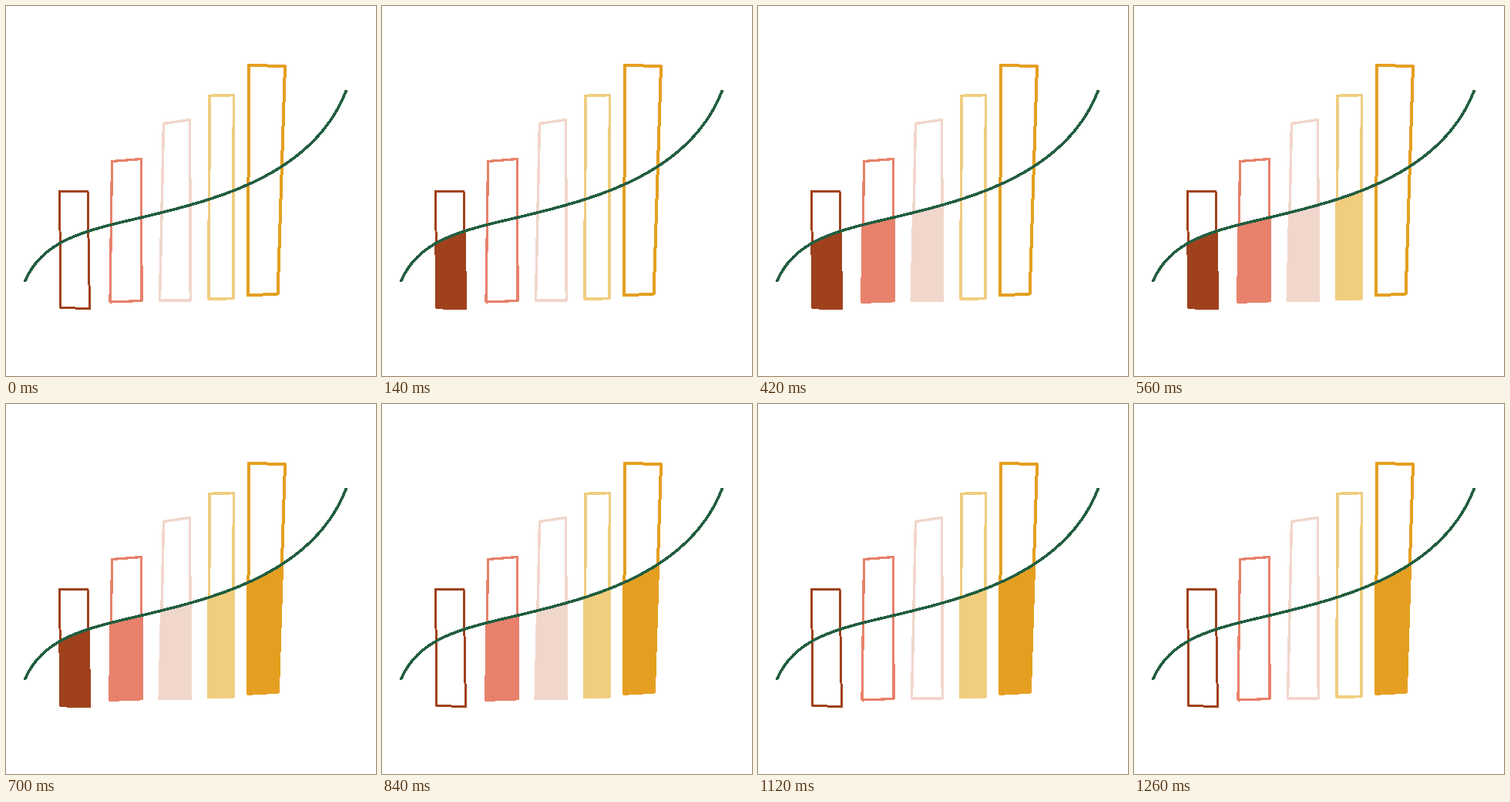
An HTML page that plays this animation: 480x480 px, repeating every 1.4 s.

```html
<!DOCTYPE html>
<html lang="en">
<head>
<meta charset="utf-8">
<title>Growing bars</title>
<style>
  html, body { margin: 0; width: 100%; height: 100%; overflow: hidden; background: #fff; }
  svg {
    display: block; width: 100%; height: 100%;
    stroke-linejoin: round; stroke-linecap: round; shape-rendering: crispEdges;
  }
</style>
</head>
<body>
<svg viewBox="0 -0.5 480 480">
  <clipPath id="below"><path id="area"/></clipPath>
  <g id="outlines" fill="none"></g>
  <g id="fills" clip-path="url(#below)"></g>
  <path id="curve" fill="none" stroke="#225e40" stroke-width="3.7"/>
</svg>
<script>
const STEP = 140;
const get = id => document.getElementById(id);

const curve = 'M25 356C50 296 120 288 200 268S400 215 441 110';
get('curve').setAttribute('d', curve);
get('area').setAttribute('d', curve + 'V480H25Z');

// colour and corners of each bar
const bars = [
  ['#a0411e', '69.5,239.5 106,240 108.5,392 71,391'],
  ['#e8816b', '137.5,201 175.5,198 176,382 135,383.5'],
  ['#f1d6cc', '204.5,152 238.5,147 239.3,381.5 199.5,381.5'],
  ['#f0cd7f', '264,116 295.5,115 294.8,379 263,379.5'],
  ['#e59f20', '315,76.5 362,77.5 352.6,373 314,375']
];

function polygon(parent, attrs) {
  const el = document.createElementNS('http://www.w3.org/2000/svg', 'polygon');
  for (const key in attrs) el.setAttribute(key, attrs[key]);
  return get(parent).appendChild(el);
}

const fills = bars.map(([stroke, points], i) => {
  const width = 3 + i / 4;
  polygon('outlines', { points, stroke, 'stroke-width': width });
  return polygon('fills', { points, stroke, fill: stroke, 'stroke-width': width + 0.6 });
});

// Bars fill one after another, then empty in the same order.
function draw(time) {
  const step = Math.floor(time / STEP) % (2 * bars.length);
  fills.forEach((el, i) => {
    const filled = step > i && step <= i + bars.length;
    el.style.display = filled ? '' : 'none';
  });
}

const start = performance.now();
function tick() {
  draw(performance.now() - start);
  requestAnimationFrame(tick);
}
tick();
</script>
</body>
</html>
```
